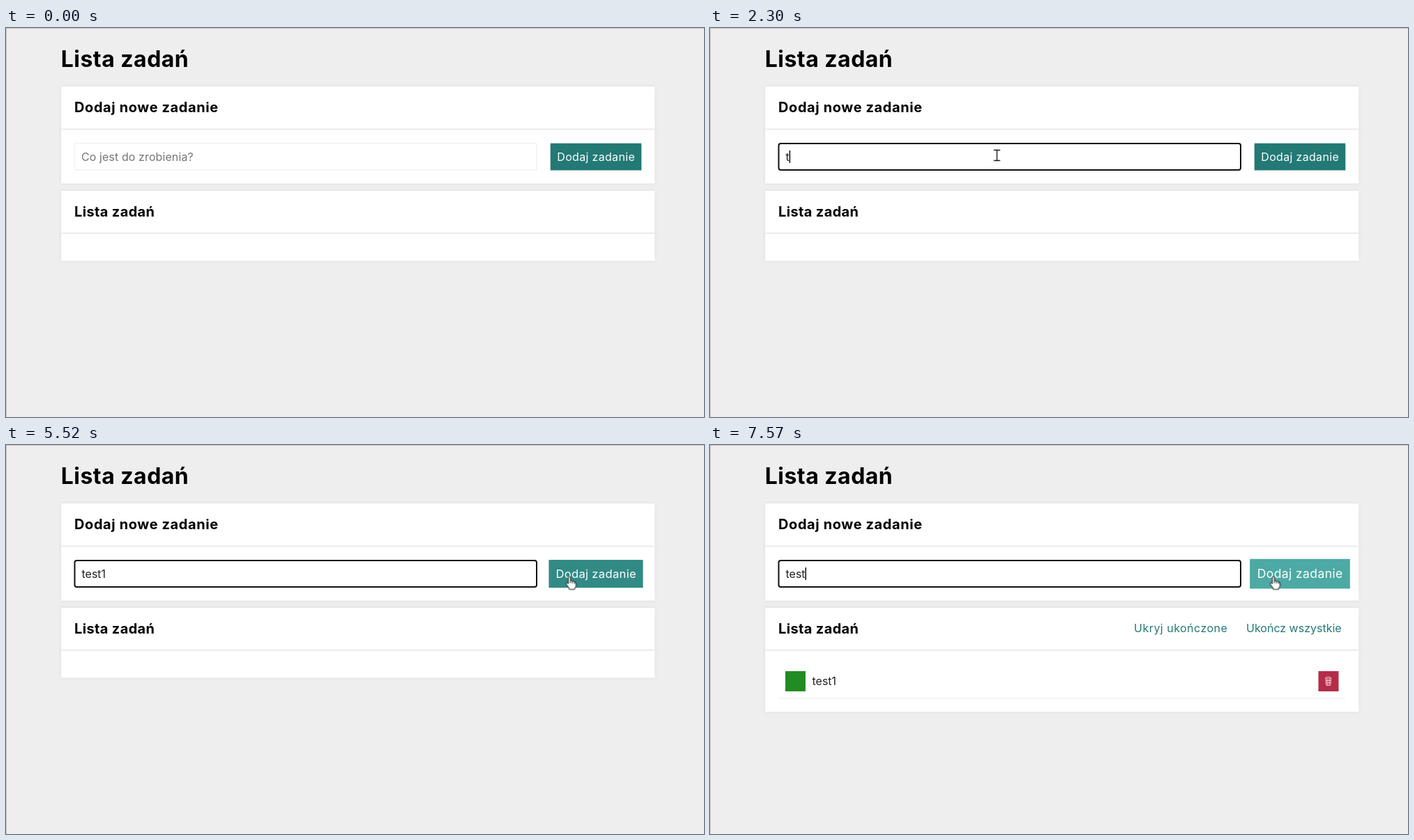
Write an HTML page that moves like this. It is 1001 by 559 pixels and loops after 8000 ms.

```html
<!DOCTYPE html>
<html lang="pl">
<head>
<meta charset="utf-8">
<title>Lista zadań</title>
<style>
  html, body { margin: 0; width: 100%; height: 100%; overflow: hidden; background: #eee; }
  svg { display: block; width: 1001px; height: 559px; }
  text { font: 16px Inter, "Open Sans", sans-serif; font-optical-sizing: none; }
  .title { font-size: 32px; font-weight: 700; letter-spacing: .015em; }
  .heading { font-size: 20px; font-weight: 700; letter-spacing: .018em; }
  .wide { letter-spacing: .03em; }
  .panel { fill: #fff; filter: drop-shadow(0 0 2px #00000014); }
  .rule { fill: #ebebeb; }
  .link { fill: #237975; }
  .hidden { visibility: hidden; }
  #field { fill: #fff; stroke: #f2f2f2; stroke-width: 1.5; }
  #field.focus { stroke: #101010; stroke-width: 2; rx: 3px; }
  #hint { fill: #757575; letter-spacing: .006em; }
  #value { fill: #222; }
  #button { transform-origin: 846px 185.1px; fill: #237975; animation: hover 8s infinite; }
  #button text { fill: #fff; text-anchor: middle; letter-spacing: .02em; }
  #pointer { animation: move 8s linear infinite; }
  .cursor { fill: #fff; stroke: #111; stroke-width: 1; stroke-linejoin: round; }
  #beam { fill: none; stroke-width: 1.4; }

  @keyframes hover {
    0%, 67.625% { fill: #237975; transform: scale(1); }
    73.875%, 75.625% { fill: #4da9a4; transform: scale(1.1); animation-timing-function: linear; }
    76.5% { fill: #4fb5b0; animation-timing-function: linear; }
    77.375% { fill: #56c8c2; animation-timing-function: ease-out; }
    80.3%, 100% { fill: #4da9a4; transform: scale(1.1); }
  }
  @keyframes move {
    0%, 7.125% { transform: translate(783px, 487px); animation-timing-function: cubic-bezier(.3, .1, .3, 1); }
    15.5%, 59.25% { transform: translate(411.5px, 183px); animation-timing-function: ease-in-out; }
    62.125% { transform: translate(688px, 182px); }
    63.875% { transform: translate(765px, 172px); }
    65.625% { transform: translate(796px, 161px); }
    66.875% { transform: translate(802px, 163px); }
    67.625% { transform: translate(805px, 170px); }
    68.5%, 100% { transform: translate(808.5px, 188.5px); }
  }
</style>
</head>
<body>
<svg viewBox="0 0 1001 559">
  <path d="M0 .5H1001M.5 0V559" stroke="#c0c0c0"/>
  <text class="title" x="78.7" y="56">Lista zadań</text>

  <rect class="panel" x="79" y="84" width="851.5" height="139.5"/>
  <rect class="rule" x="79" y="144.5" width="851.5" height="2"/>
  <text class="heading wide" x="98" y="121">Dodaj nowe zadanie</text>
  <rect id="field" x="98.5" y="166" width="662.5" height="38"/>
  <text id="hint" x="108" y="190.5">Co jest do zrobienia?</text>
  <text id="value" x="108.5" y="190.5"></text>
  <rect id="caret" y="176" width="1.4" height="18"/>
  <g id="button">
    <rect x="780.7" y="165.7" width="130.6" height="38.8"/>
    <text x="846.2" y="190.5">Dodaj zadanie</text>
  </g>

  <rect id="list" class="panel" x="79" y="234" width="851.5" height="100.5"/>
  <rect class="rule" x="79" y="293.8" width="851.5" height="2"/>
  <text class="heading" x="98" y="270.5">Lista zadań</text>
  <g id="tasks">
    <text class="link wide" x="608" y="269">Ukryj ukończone</text>
    <text class="link" x="769" y="269">Ukończ wszystkie</text>
    <rect x="108" y="325" width="29" height="29" fill="#228b22"/>
    <text x="146.5" y="345" fill="#222">test1</text>
    <rect x="872.5" y="325" width="29" height="29" fill="#b42c48"/>
    <g fill="none" stroke="#f3dce1" stroke-width=".9">
      <ellipse cx="886.7" cy="334.7" rx="4" ry="1.3"/>
      <path d="M882.8 335L883.6 345Q886.7 346.6 889.8 345L890.6 335M885.2 336.5L885.5 345M888.2 336.5L887.9 345M883 338.5H890.4M883.3 341.7H890.1"/>
    </g>
    <rect class="rule" x="98" y="363.5" width="813" height="1"/>
  </g>

  <circle id="press" r="12" fill="#ff0" fill-opacity=".5"/>
  <g id="pointer">
    <path id="arrow" class="cursor" d="M.5 .5V16L4 12.6 6.3 18 8.6 17 6.3 11.8H11.3Z"/>
    <path id="beam" class="cursor" d="M-4.5-7.5H4.5M-4.5 7.5H4.5M0-7.5V7.5"/>
    <path id="hand" class="cursor" d="M-2 1.5Q-.5-.5 1 1.5V7Q3 5.5 4 7.5 6 6 7 8.5 9 7.5 9 10V13Q9 16 7 17V19H-1V17L-5 11.5Q-5.5 9-3.5 9.5L-2 11ZM1 7V10M4 7.5V10.5M7 8.5V11"/>
  </g>
</svg>
<script>
  const LOOP = 8000;
  const $ = id => document.getElementById(id);

  const typing = [[0, ''], [2300, 't'], [2500, 'te'], [2700, 'tes'], [2830, 'test'], [3430, 'test1'],
    [6190, ''], [7180, 't'], [7310, 'te'], [7510, 'tes'], [7570, 'test']];
  const cursors = [[0, ''], [570, 'arrow'], [1070, 'beam'], [5080, 'arrow'], [5410, 'hand']];
  const blinks = [[1510, 2050], [2300, 3370], [3430, 3970], [4510, 5050], [5580, 6050], [6190, 6720], [7180, LOOP]];
  const focus = [[1510, 6050], [6190, LOOP]];
  const presses = [[1510, 1650], [6050, 6190]];

  const latest = (track, t) => track.findLast(([start]) => start <= t)[1];
  const within = (spans, t) => spans.some(([from, to]) => t >= from && t < to);
  const show = (id, on) => $(id).classList.toggle('hidden', !on);

  const began = performance.now();

  function draw() {
    const t = (performance.now() - began) % LOOP;
    const value = latest(typing, t);
    const cursor = latest(cursors, t);
    const added = t >= 6190;

    if ($('value').textContent !== value) $('value').textContent = value;
    $('caret').setAttribute('x', 108.5 + (value ? $('value').getComputedTextLength() : 0));
    show('hint', !value);
    show('caret', within(blinks, t));
    $('field').classList.toggle('focus', within(focus, t));

    for (const id of ['arrow', 'beam', 'hand']) show(id, id === cursor);
    show('press', within(presses, t));
    $('press').setAttribute('cx', t < 4000 ? 410 : 808.5);
    $('press').setAttribute('cy', t < 4000 ? 182 : 188);

    show('tasks', added);
    $('list').setAttribute('height', added ? 149.5 : 100.5);
    requestAnimationFrame(draw);
  }
  draw();
</script>
</body>
</html>
```
